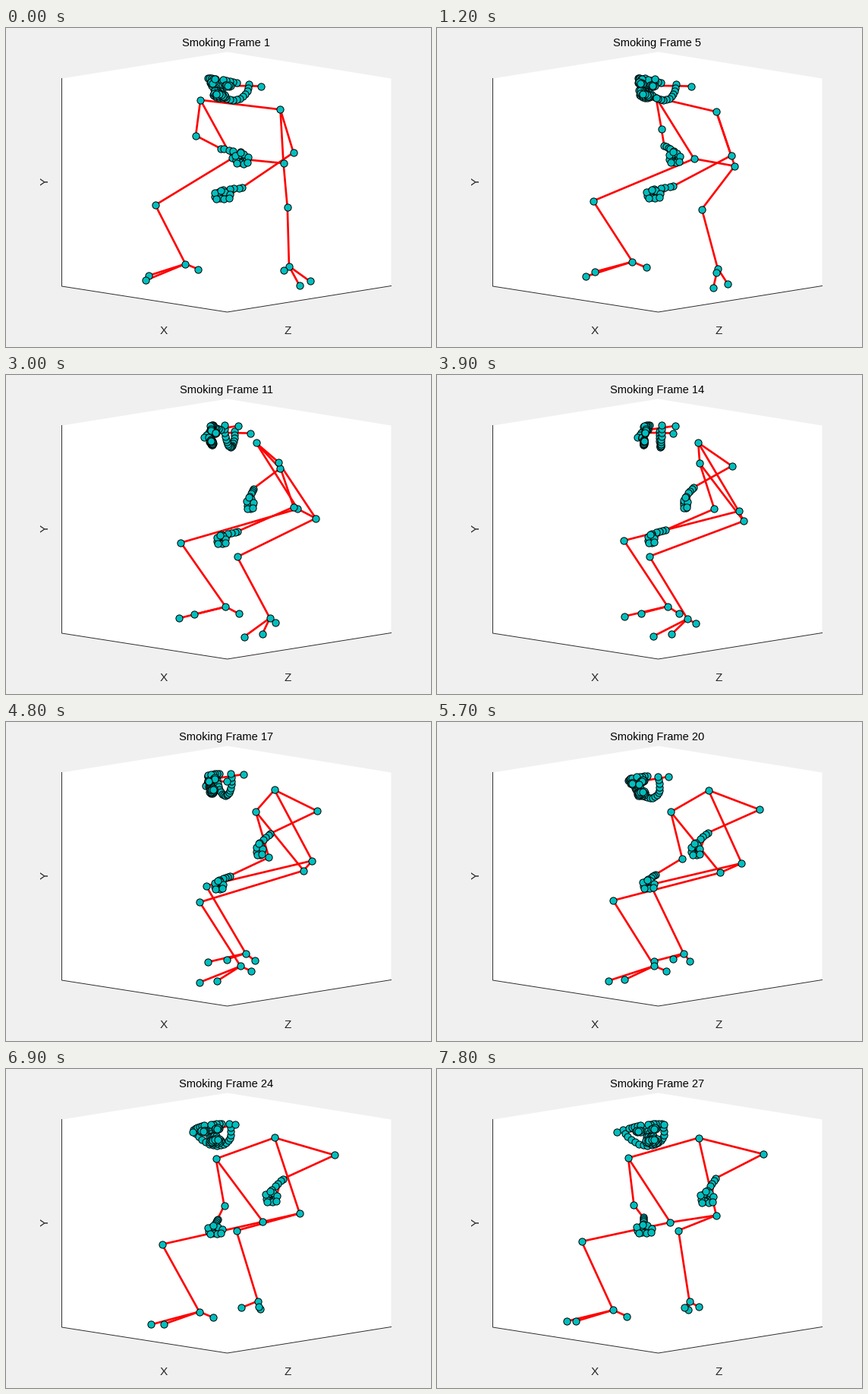
A matplotlib script that plays this animation: 560 by 420 pixels, repeating every 8000 ms.

```python
import numpy as np
import matplotlib.pyplot as plt
from matplotlib.animation import FuncAnimation
from matplotlib.collections import LineCollection

W, H, DPI = 560, 420, 96
TICKS, LAST_POSE = 80, 27
TILT = .14  # how much depth shows as height

# A joint circles its own axis: axis x, sideways, backward, height, rise over the loop.
LEFT = {
    "shoulder": (252, -36, 99, 109, -26),
    "elbow": (286, -87, 118, 161, -54),
    "wrist": (310, -44, 35, 165, -21),
    "hip": (262, -18, 140, 190, -11),
    "knee": (269, -74, -11, 235, -15),
    "ankle": (263, -49, 49, 319, -14),
    "palm": (338, -28, -7, 172, 0),
}
RIGHT = {
    "shoulder": (263, 77, 71, 112, -10),
    "elbow": (268, 85, 84, 170, -8),
    "wrist": (281, 26, 15, 210, -19),
    "hip": (262, 57, 134, 192, -10),
    "knee": (281, 104, -19, 228, -9),
    "ankle": (272, 91, 43, 314, -10),
    "palm": (274, 8, 6, 220, -11),
}
# Offsets from the ankle, mirrored for the two feet: outward, backward, drop.
FOOT = {"heel": (-13, 13, 8), "big toe": (41, -28, 14), "small toe": (36, -52, 17)}

BONES = [("shoulder", "elbow"), ("elbow", "wrist"), ("shoulder", "hip"),
         ("hip", "knee"), ("knee", "ankle")] + [("ankle", part) for part in FOOT]


def ease(s):
    s = np.clip(s, 0, 1)
    return s * s * (3 - 2 * s)


def body_angle(t):
    return np.radians(22 + 4.5 * (t - 1))


def turn(side, back, angle):
    """Screen offset of a point carried round by the turning body."""
    c, s = np.cos(angle), np.sin(angle)
    return np.array([side * c + back * s, TILT * (side * s - back * c)])


def place_joints(joints, sign, t):
    angle, progress = body_angle(t), (t - 1) / (LAST_POSE - 1)
    p = {name: np.array([axis, height + rise * progress]) + turn(side, back, angle)
         for name, (axis, side, back, height, rise) in joints.items()}
    for name, (out, back, drop) in FOOT.items():
        p[name] = p["ankle"] + turn(sign * out, back, angle) + (0, drop)
    return p


def oval(n, u, v, ru, rv, w):
    a = np.arange(n) * 2 * np.pi / n
    return np.column_stack([u + ru * np.cos(a), v + rv * np.sin(a), np.full(n, w)])


def make_face():
    """Face marks as (sideways, down, forward) shares of the head size."""
    a = np.linspace(-np.pi / 2, np.pi / 2, 17)
    jaw = np.column_stack([np.sin(a), np.cos(a), 0 * a])
    parts = [jaw, np.linspace((0, 0, 1), (0, .35, 1.4), 4),
             np.linspace((-.18, .42, 1.1), (.18, .42, 1.1), 5),
             oval(12, 0, .68, .32, .13, 1), oval(8, 0, .68, .2, .06, 1)]
    for side in (-1, 1):
        parts += [np.linspace((.75 * side, -.12, .7), (.2 * side, -.2, 1), 5),
                  oval(6, .4 * side, .08, .14, .05, .9)]
    return np.vstack(parts)


FACE = make_face()
EYES = np.array([(.4, .08, .9), (-.4, .08, .9)])
EARS = np.array([(1.2, .12, -.8), (-1.2, .12, -.8)])


def head(t):
    yaw = np.radians(15 + 6 * (t - 1))
    lean = ease((t - 14) / 8)
    origin = np.array([294 - 24 * lean, 70 + 6 * lean])
    basis = np.array([(-26 * np.cos(yaw), -4), (12 * lean, 24),
                      (-24 * np.sin(yaw + .35), 2)])
    face, eyes, ears = (origin + part @ basis for part in (FACE, EYES, EARS))
    return np.vstack([face, eyes, ears]), list(zip(eyes, ears))


def hand(wrist, palm, thickness, height, t):
    width = thickness + 9 * abs(np.cos(body_angle(t) + .16))
    size = np.array([width, height])
    k = np.arange(17)
    r, a = np.sqrt((k + .5) / 17), k * 2.39996
    fingers = palm + size * np.column_stack([r * np.cos(a), r * np.sin(a)])
    thumb = wrist + np.outer([.17, .4, .6, .95], palm - (0, height) - wrist)
    return np.vstack([thumb, fingers]), [(wrist, thumb[0]), (thumb[0], palm + .6 * size)]


def pose(t):
    face, lines = head(t)
    points, sides = [face], []
    for joints, sign, thickness, height in ((LEFT, -1, 3, 8.5), (RIGHT, 1, 5, 6.5)):
        p = place_joints(joints, sign, t)
        palm = p.pop("palm")
        hand_points, hand_lines = hand(p["wrist"], palm, thickness, height, t)
        points += [np.array(list(p.values())), hand_points]
        lines += [(p[a], p[b]) for a, b in BONES] + hand_lines
        sides.append(p)
    lines += [(sides[0][j], sides[1][j]) for j in ("shoulder", "hip")]
    return np.vstack(points), lines


plt.rcParams["font.family"] = "Liberation Sans"
fig = plt.figure(figsize=(W / DPI, H / DPI), dpi=DPI, facecolor="#f0f0f0")
ax = fig.add_axes([0, 0, 1, 1])
ax.set(xlim=(-.5, W - .5), ylim=(H - .5, -.5))
ax.axis("off")

INK = "#262626"
box = [(73, 66), (291, 31), (507, 66), (507, 339), (291, 373.5), (73, 339.5)]
ax.fill(*zip(*box), color="white", lw=0)
ax.plot([73, 73, 291, 507], [66, 339.5, 373.5, 339], color=INK, lw=.7)
label = dict(fontsize=11.5, ha="center", color=INK)
ax.text(207.5, 403, "X", va="baseline", **label)
ax.text(370.5, 403, "Z", va="baseline", **label)
ax.text(51, 201.5, "Y", va="center", rotation=90, **label)
title = ax.text(290, 24, "", fontsize=11, ha="center", va="baseline", color="black")

bones = LineCollection([], colors="red", linewidths=2, capstyle="butt", zorder=3)
ax.add_collection(bones, autolim=False)
dots, = ax.plot([], [], "o", ms=6.9, mfc="#00bfbf", mec="black", mew=.75, zorder=4)


def update(tick):
    t = min(tick // 3 + 1, LAST_POSE)
    points, lines = pose(t)
    dots.set_data(*points.T)
    bones.set_segments(lines)
    title.set_text(f"Smoking Frame {t}")
    return dots, bones, title


anim = FuncAnimation(fig, update, frames=TICKS, interval=100, repeat=True, repeat_delay=0)
plt.show()
```
